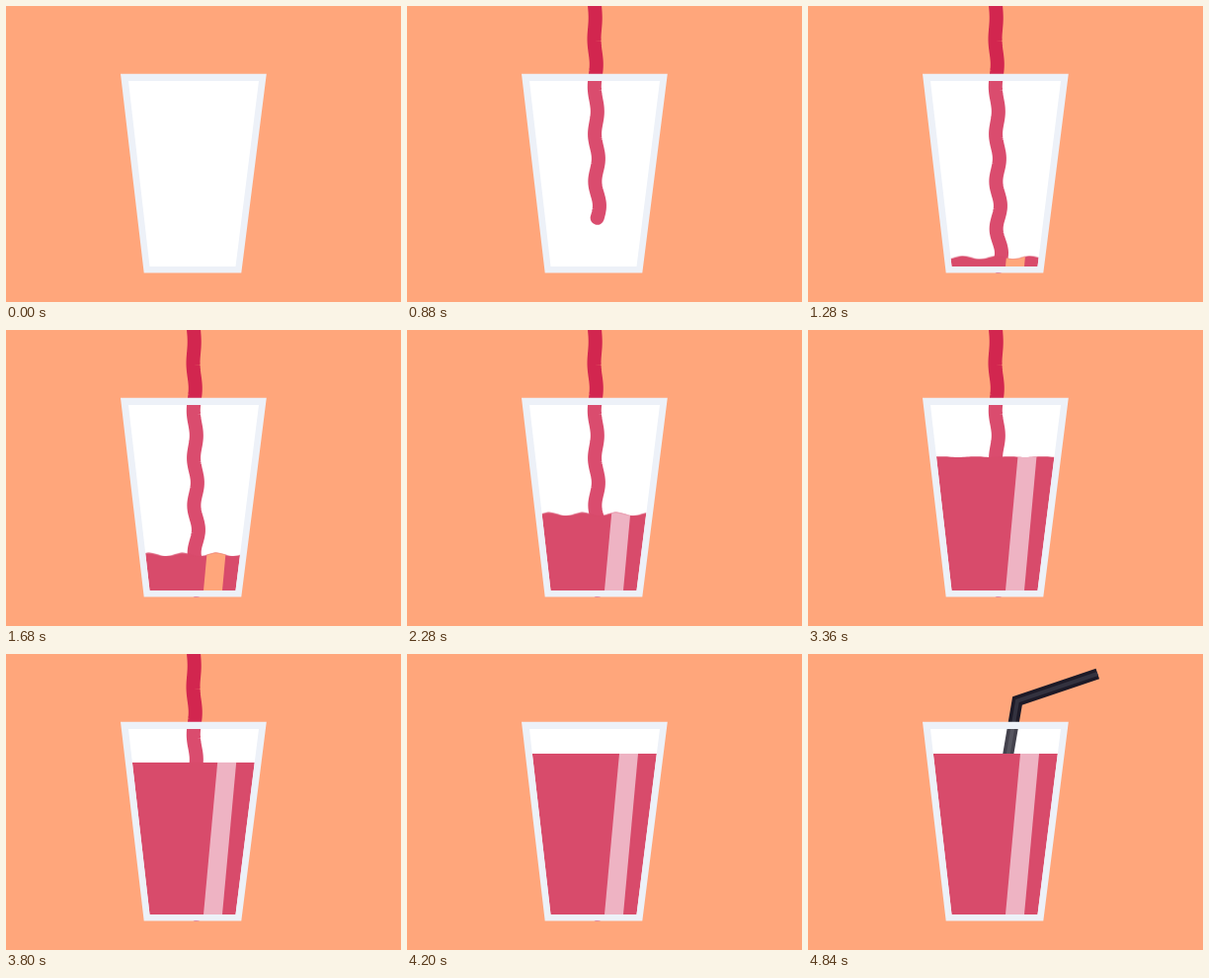
Animation, 400 px wide and 300 px high, one loop 8.04 s. Source, as an HTML page:

```html
<!DOCTYPE html>
<html lang="en">
<head>
<meta charset="utf-8">
<title>Filling a glass</title>
<style>
  html, body { margin: 0; width: 100%; height: 100%; overflow: hidden; background: #ffa67b; }
  svg { display: block; width: 100vw; height: 100vh; }

  #stream, #straw, .level, .calm, .shine { animation: 8040ms linear infinite; }
  #stream {
    fill: none; stroke: #d2264f; stroke-width: 14; stroke-linecap: round; stroke-linejoin: round;
    stroke-dasharray: 284 900; animation-name: pour;
  }
  #straw { fill: none; stroke-linejoin: miter; animation-name: drop; }
  .level { animation-name: rise; }
  .calm { animation-name: settle; }
  .wave { animation: drift calc(8040ms / 13) linear infinite; }
  .liquid { fill: #d84b6b; }
  .shine { animation-name: tint; }

  @keyframes pour {
    0%, 6.06% { stroke-dashoffset: 284px; visibility: hidden; }
    6.065% { visibility: visible; }
    12.002%, 48.756% { stroke-dashoffset: 0; }
    54.66% { visibility: visible; }
    54.664%, 100% { stroke-dashoffset: -284px; visibility: hidden; }
  }
  @keyframes rise {
    0%, 13.68% { transform: translateY(269px); }
    20.896% { transform: translateY(229.3px); }
    28.358% { transform: translateY(188.3px); }
    36.816% { transform: translateY(146.3px); }
    47.264% { transform: translateY(110px); }
    50.995%, 100% { transform: translateY(101px); }
  }
  @keyframes settle {
    0%, 29% { transform: scaleY(1); }
    36.816% { transform: scaleY(.55); }
    46%, 100% { transform: scaleY(0); }
  }
  @keyframes drift {
    from { transform: translateX(0); }
    to { transform: translateX(34px); }
  }
  @keyframes tint {
    0%, 27.11% { fill: #ffa67b; }
    27.115%, 100% { fill: #eeb3c3; }
  }
  @keyframes drop {
    0%, 52.239% { transform: translateY(-150px); animation-timing-function: ease-out; }
    57.214%, 100% { transform: translateY(0); }
  }
</style>
</head>
<body>
<svg viewBox="0 0 400 300">
  <defs>
    <clipPath id="inside"><path d="M124 76H256L232.5 264H145.5Z"/></clipPath>
    <clipPath id="band"><path d="M215 101H234L219 264H200Z"/></clipPath>
  </defs>
  <rect width="400" height="300" fill="#ffa67b"/>
  <path d="M120 72H260L235 268H143Z" fill="#fff"/>

  <path id="stream"/>
  <g id="straw">
    <path d="M197.9 130L212 47.5L293.3 20" stroke="#1d1a27" stroke-width="11"/>
    <path d="M197.9 130L212 47.5L293.3 20" stroke="#33323f" stroke-width="4"/>
  </g>
  <path d="M124 76H256L232.5 264H145.5Z" fill="#fff" opacity=".175"/>

  <g clip-path="url(#inside)">
    <g class="liquid">
      <g class="level">
        <g class="calm"><path class="wave"/></g>
        <rect x="100" width="200" height="200"/>
      </g>
    </g>
    <g class="shine" clip-path="url(#band)">
      <g class="level">
        <g class="calm"><path class="wave"/></g>
        <rect x="100" width="200" height="200"/>
      </g>
    </g>
  </g>
  <path d="M116 68.8H263.8L238.3 270.6H139.7ZM124 76L145.5 264H232.5L256 76Z"
        fill="#edf1f8" fill-rule="evenodd"/>
</svg>
<script>
  const TAU = Math.PI * 2;

  function curve(from, to, step, point) {
    const points = [];
    for (let v = from; v <= to; v += step) points.push(point(v).map(n => n.toFixed(2)).join(" "));
    return "M" + points.join("L");
  }

  // The stream sways a little more the further it falls.
  const sway = y => 189.9 + y * 0.014 + (0.6 + y * 0.008) * Math.cos(TAU * (y - 106) / 48);
  const stream = document.getElementById("stream");
  stream.setAttribute("d", curve(-20, 264, 2, y => [sway(y), y]));
  stream.setAttribute("pathLength", 284);

  const ripple = curve(60, 300, 2, x => [x, -1.7 + 1.7 * Math.sin(TAU * (x + 7) / 34)]) + "V10H60Z";
  document.querySelectorAll(".wave").forEach(wave => wave.setAttribute("d", ripple));
</script>
</body>
</html>
```
